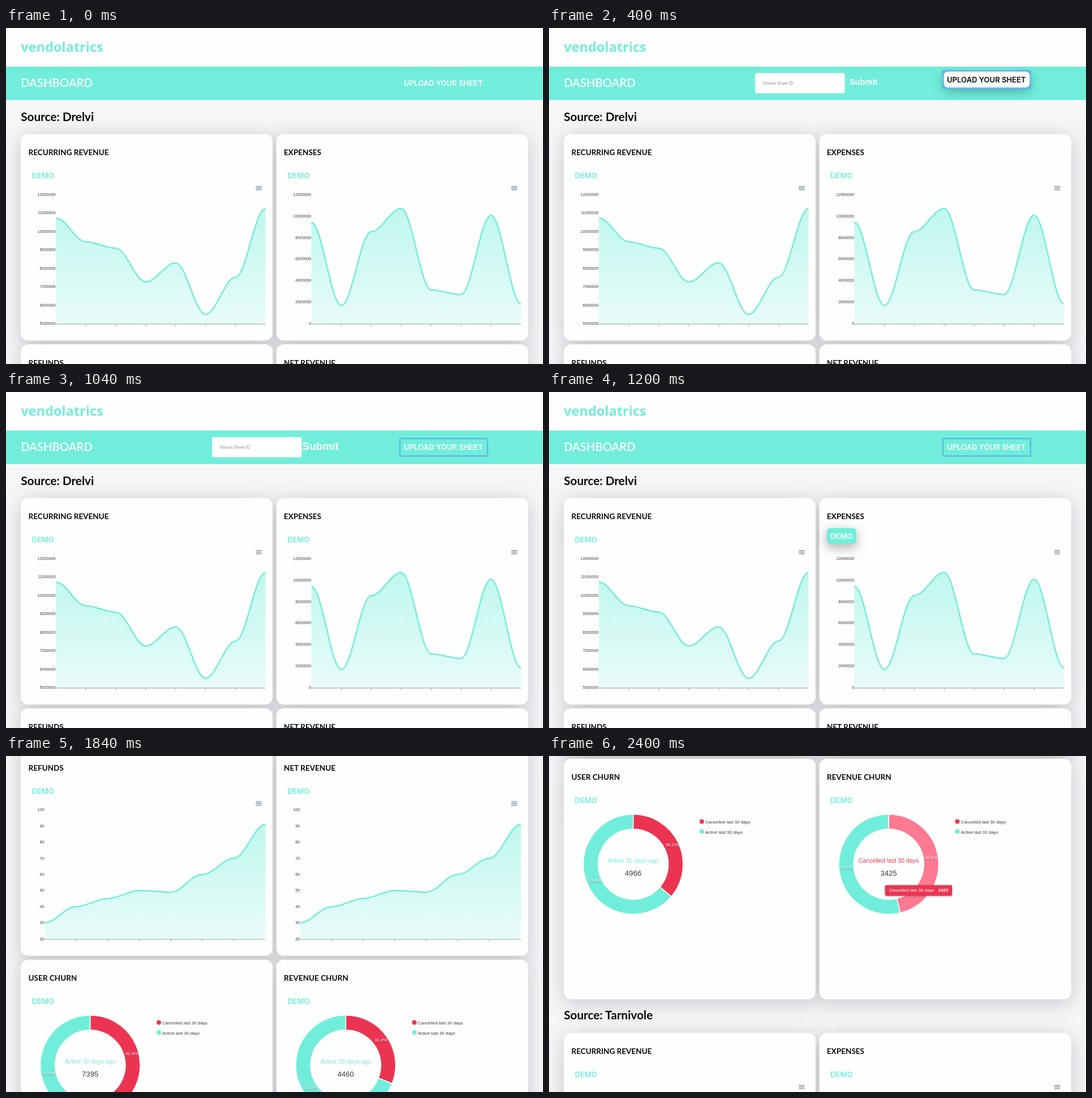
These frames come from a looping animation (947 px wide and 592 px high, 2800 ms). An HTML page:

```html
<!DOCTYPE html>
<html lang="en">
<head>
<meta charset="utf-8">
<title>Dashboard</title>
<style>
  html, body { margin: 0; width: 100%; height: 100%; overflow: hidden; background: #f7f7f9; }
  svg { display: block; width: 100%; height: 100%; }
  text { font-family: "Liberation Sans", Arial, sans-serif; fill: #373d3f; white-space: pre; }
  .logo { font: 700 23.5px "Open Sans", sans-serif; fill: #71eedb; }
  .bar { font: 600 20.2px Lato, sans-serif; fill: #fff; }
  .source { font: 700 20.7px Lato, sans-serif; fill: #0a0a0a; }
  .title { font: 700 13.5px Lato, sans-serif; fill: #0a0a0a; }
  .button { font: 600 13px Inter, sans-serif; }
  .hint { font: 400 7.2px Inter, sans-serif; fill: #8a8a8a; }
  .axis { font-size: 7.2px; text-anchor: end; }
  .small { font-size: 7.9px; }
  .mid { text-anchor: middle; }
  .pct { font-size: 7.9px; text-anchor: middle; fill: #fff; filter: drop-shadow(0 1px 1px rgba(0,0,0,.5)); }
  .shade { fill: #fff; filter: drop-shadow(0 6px 19px rgba(30,30,50,.23)); }
  .lift { filter: drop-shadow(0 6px 10px rgba(0,0,0,.32)); }
</style>
</head>
<body>
<svg id="stage" viewBox="0 0 947 592" preserveAspectRatio="none"></svg>
<script>
const MINT = '#71eedb', RED = '#ec3452', PINK = '#ff7a90', RING = '#62b5ea';
const STEP = 400, COL = 450.6;
const stage = document.getElementById('stage');

const text = (x, y, s, cls, extra = '') => `<text x="${x}" y="${y}" class="${cls}" ${extra}>${s}</text>`;
const rect = (x, y, w, h, r, extra) => `<rect x="${x}" y="${y}" width="${w}" height="${h}" rx="${r}" ${extra}/>`;
const at = (x, y, body) => `<g transform="translate(${x} ${y})">${body}</g>`;

const trend = { left: 68, min: 20, max: 100, step: 10, unit: '', data: [30, 40, 45, 50, 49, 60, 70, 91] };
const revenue = { left: 88, min: 5, max: 12, step: 1, unit: '000000',
  data: [10.72, 9.44, 9.09, 7.26, 8.29, 5.5, 7.52, 11.24] };
const expenses = { left: 88, min: 0, max: 12, step: 2, unit: '000000',
  data: [9.41, 1.68, 8.56, 10.7, 3.13, 2.71, 10.07, 1.84] };

const rows = [
  { y: 187, h: 363.5, cards: [['RECURRING REVENUE', revenue], ['EXPENSES', expenses]] },
  { y: 557.5, h: 363.5, cards: [['REFUNDS', trend], ['NET REVENUE', trend]] },
  { y: 928, h: 423.5, cards: [['USER CHURN'], ['REVENUE CHURN']] },
  { y: 1411, h: 363.5, cards: [['RECURRING REVENUE', trend], ['EXPENSES', trend]] }
];

const early = [[42.4, 7395], [31, 4460]];
const late = [[36.2, 4966], [46.3, 7402]];
const states = [
  { scroll: 0 },
  { scroll: 0, submit: 14.5, ring: true, raised: true },
  { scroll: 0, submit: 19, ring: true },
  { scroll: 0, ring: true, hover: 'EXPENSES' },
  { scroll: 569, churn: early },
  { scroll: 923, churn: late, hover: 'REVENUE CHURN' },
  { scroll: 923, churn: late, tip: 3425 }
];

// Area chart whose curve is level at every data point.
function chart({ left, min, max, step, unit, data }) {
  const base = 333.8, right = 457.6, gap = (right - left) / (data.length - 1);
  const py = v => +(base - (v - min) / (max - min) * 227.3).toFixed(2);
  const px = i => left + i * gap;
  let line = `M${left} ${py(data[0])}`, ticks = `M${left} 334.7H${right}`, out = '';
  for (let i = 1; i < data.length; i++) {
    const a = py(data[i - 1]), b = py(data[i]);
    line += `C${px(i - 1) + gap * .35} ${a} ${px(i) - gap * .35} ${b} ${px(i)} ${b}`;
    if (i < data.length - 1) ticks += `M${px(i)} 334.7v4`;
  }
  for (let v = min; v <= max; v += step)
    out += text(left - .4, py(v) + 2.3, v ? v + unit : '0', 'axis');
  return out
    + `<path d="${line}V334.7H${left}Z" fill="url(#fade)"/>`
    + `<path d="${ticks}" fill="none" stroke="#93a5a8"/>`
    + `<path d="${line}" fill="none" stroke="${MINT}" stroke-width="2.5"/>`
    + '<path d="M440.5 92.3h10.4m-10.4 2.9h10.4m-10.4 2.9h10.4" stroke="#6e8192" stroke-width="1.2"/>';
}

function donut([share, total], tip) {
  const cx = 148.5, cy = 185.7, R = 88, r = 62;
  const spot = (p, d) => {
    const a = p / 100 * 2 * Math.PI;
    return [cx + d * Math.sin(a), cy - d * Math.cos(a)].map(n => n.toFixed(2));
  };
  const slice = (p, q, fill) => {
    const big = q - p > 50 ? 1 : 0;
    return `<path d="M${spot(p, R)}A${R} ${R} 0 ${big} 1 ${spot(q, R)}L${spot(q, r)}`
      + `A${r} ${r} 0 ${big} 0 ${spot(p, r)}Z" fill="${fill}" stroke="#fff" stroke-width="1.4"/>`;
  };
  const label = (p, n) => text(...spot(p, 75), n.toFixed(1) + '%', 'pct');
  const legend = (y, fill, s) => `<circle cx="269.5" cy="${y}" r="4" fill="${fill}"/>` + text(275.6, y + 4, s, 'small');
  return slice(0, share, tip ? PINK : RED) + slice(share, 100, MINT)
    + label(share / 2, share) + label(50 + share / 2, 100 - share)
    + text(148.4, 182.7, tip ? 'Cancelled last 30 days' : 'Active 30 days ago', 'mid',
        `style="font-size:10.55px;fill:${tip ? RED : MINT}"`)
    + text(148.4, 206.4, tip || total, 'mid', 'style="font-size:13.1px"')
    + legend(110.4, RED, 'Cancelled last 30 days') + legend(128.1, MINT, 'Active last 30 days');
}

function card([name, plot], col, state) {
  const hot = state.hover === name;
  let out = text(39.5, 37.4, name, 'title');
  if (hot) out += rect(39.4, 52.7, 52, 28, 6.5, `fill="${MINT}" class="lift"`);
  out += text(45.6, hot ? 71.7 : 78.2, 'DEMO', 'button', `fill="${hot ? '#fff' : MINT}" style="fill:${hot ? '#fff' : MINT}"`);
  if (plot) return out + chart(plot);
  return state.churn ? out + donut(state.churn[col], col && state.tip) : out;
}

function header({ submit, ring, raised }) {
  let out = rect(0, 0, 947, 68, 0, 'fill="#fefefe"') + rect(0, 68, 947, 59, 0, `fill="${MINT}"`)
    + text(26.2, 42, 'vendolatrics', 'logo') + text(26.2, 103.7, 'DASHBOARD', 'bar');
  if (submit)
    out += rect(363.5, 79.5, 158, 35.6, 3, 'fill="#fff"') + text(376.7, 100.2, 'Volune Sheet ID', 'hint')
      + text(554.7, 95 + submit * .36, 'Submit', 'mid', `style="font-size:${submit}px;font-weight:700;fill:#fff"`);
  const dy = raised ? -6.5 : 0;
  if (raised) out += rect(696.3, 76.7, 151.4, 28, 7, 'fill="#fff" class="lift"');
  if (ring) out += rect(694.7, 82 + dy, 154.4, 30.8, 1.5, `fill="${raised ? RING : 'none'}" stroke="${RING}" stroke-width="2.5"`);
  if (raised) out += rect(696.3, 76.7, 151.4, 28, 7, 'fill="#fff"');
  return out + text(701.8, 102.3 + dy, 'UPLOAD YOUR SHEET', 'button', `style="fill:${raised ? '#0a0a0a' : '#fff'}"`);
}

function tooltip(n) {
  return rect(592.5, 227.6, 118.5, 19, 3, `fill="${RED}" style="filter:drop-shadow(0 1px 2px rgba(0,0,0,.2))"`)
    + text(599.4, 239.3, 'Cancelled last 30 days:', 'small', 'style="fill:#fff"')
    + text(686.5, 239.3, n, 'small', 'style="fill:#fff;font-weight:700"');
}

function scene(state) {
  const boxes = cls => rows.map(({ y, h }) =>
    [0, 1].map(c => rect(26.3 + c * COL, y, 443.8, h, 13, cls)).join('')).join('');
  const cards = rows.map(({ y, cards }) =>
    cards.map((c, i) => at(i * COL, y, card(c, i, state))).join('')).join('');
  return `<defs><linearGradient id="fade" x2="0" y2="1">
      <stop stop-color="${MINT}" stop-opacity=".45"/><stop offset="1" stop-color="${MINT}" stop-opacity=".15"/>
    </linearGradient></defs>`
    + rect(0, 0, 947, 592, 0, 'fill="#f7f7f9"')
    + at(0, -state.scroll,
        boxes('class="shade"') + boxes('fill="#fefefe"') + header(state)
        + text(26.2, 163.6, 'Source: Drelvi', 'source') + text(26.2, 1387.2, 'Source: Tarnivole', 'source')
        + cards)
    + (state.tip ? tooltip(state.tip) : '');
}

let shown = -1;
function draw(now) {
  const i = Math.floor(now / STEP) % states.length;
  if (i !== shown) stage.innerHTML = scene(states[shown = i]);
}

const start = performance.now();
function loop() {
  draw(performance.now() - start);
  requestAnimationFrame(loop);
}
loop();
</script>
</body>
</html>
```
